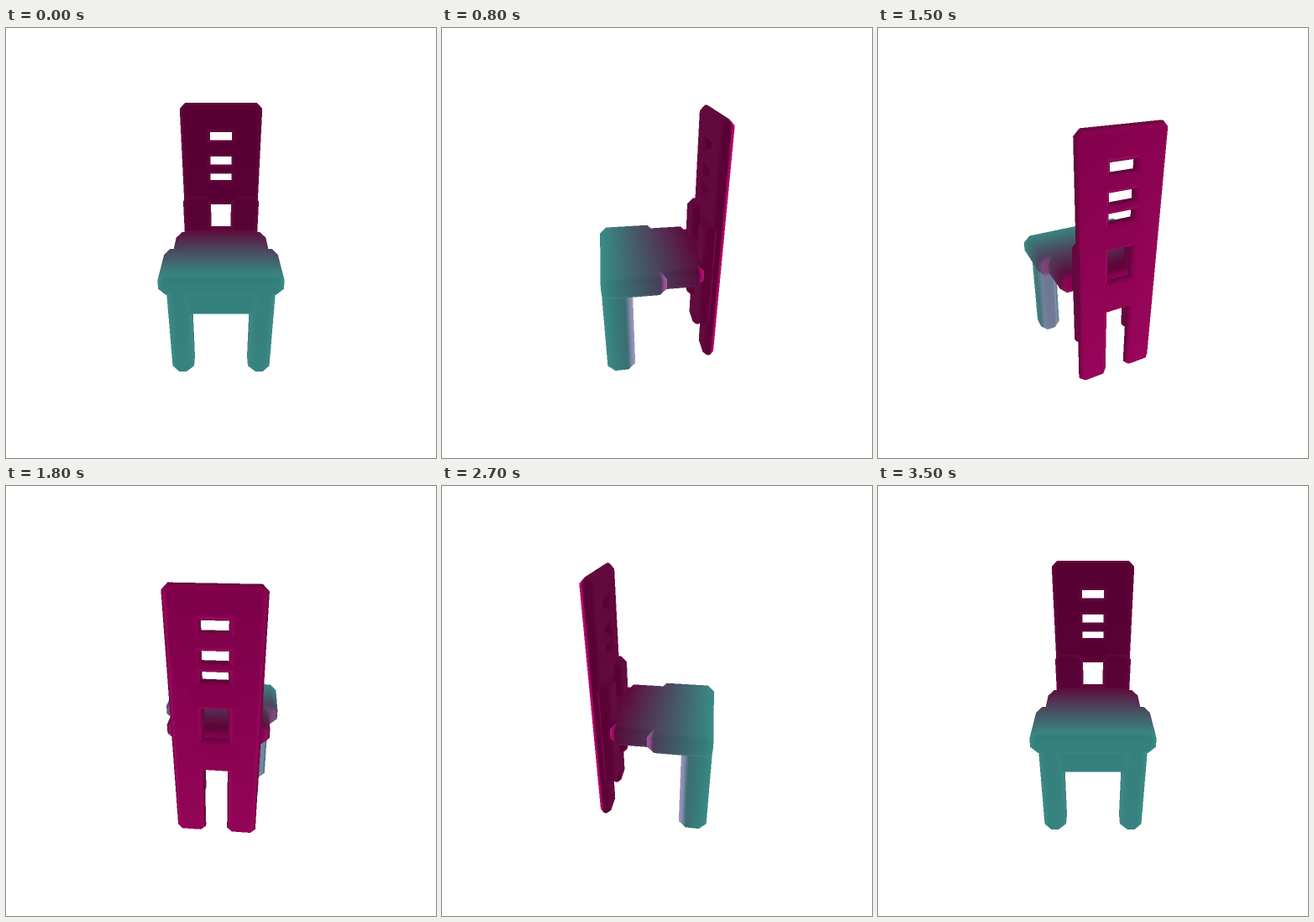
Recreate the animation shown at these times as an HTML page with a canvas. Size 512x512 px, loop 3600 ms.

```html
<!DOCTYPE html>
<html lang="en">
<head>
<meta charset="utf-8">
<title>Turning chair</title>
<style>
html, body { margin: 0; width: 100%; height: 100%; overflow: hidden; background: #fff; }
canvas { display: block; width: 512px; height: 512px; }
</style>
</head>
<body>
<canvas id="stage" width="512" height="512"></canvas>
<script>
const STEPS = 36, STEP_MS = 100;
const DIST = 454, TILT = 28.7 * Math.PI / 180;
const SIZE = 512, SS = 2, N = SIZE * SS;
const sinT = Math.sin(TILT), cosT = Math.cos(TILT);
const clamp = (v, lo, hi) => Math.min(hi, Math.max(lo, v));
const mix = (a, b, t) => a + (b - a) * t;

// Mesh: x right, y up, z towards the front of the chair
const verts = [], tris = [];

// Box with flat chamfers of size r, but smooth normals
function addBox(x0, x1, y0, y1, z0, z1, r) {
  const mid = [(x0 + x1) / 2, (y0 + y1) / 2, (z0 + z1) / 2];
  const half = [(x1 - x0) / 2, (y1 - y0) / 2, (z1 - z0) / 2];
  const cuts = half.map(h => [-h, -h + r, h - r, h]);
  for (let a = 0; a < 3; a++) for (const side of [-1, 1]) {
    const b = (a + 1) % 3, c = (a + 2) % 3, first = verts.length;
    for (const u of cuts[b]) for (const v of cuts[c]) {
      const q = [];
      q[a] = side * half[a]; q[b] = u; q[c] = v;
      const core = q.map((e, i) => clamp(e, r - half[i], half[i] - r));
      const d = q.map((e, i) => e - core[i]);
      const len = Math.hypot(...d);
      const span = d.reduce((sum, e) => sum + Math.abs(e), 0);
      verts.push({
        p: d.map((e, i) => mid[i] + core[i] + e / span * r),
        n: d.map(e => e / len)
      });
    }
    for (let i = 0; i < 3; i++) for (let j = 0; j < 3; j++) {
      const k = first + i * 4 + j;
      tris.push([k, k + 1, k + 4], [k + 1, k + 5, k + 4]);
    }
  }
}

function addPair(x0, x1, ...rest) {
  addBox(x0, x1, ...rest);
  addBox(-x1, -x0, ...rest);
}

// Back: posts, top rail and slats
addPair(13, 47.5, -148, 149, -68, -54, 6);
addPair(13, 48, -96, 38, -62, -44, 7);
addBox(-47.5, 47.5, 116.5, 149, -68, -54, 6);
for (const [lo, hi] of [[87.5, 106.5], [66, 76.5], [24.5, 56.5], [-54, -11.5]])
  addBox(-30, 30, lo, hi, -68, -54, 5);
// Seat: three overlapping slabs with one flush top
addBox(-68, 68, -32, -5, -3, 68, 8);
addBox(-58, 58, -32, -5, -46, 30, 8);
addBox(-47, 47, -30, -5, -62, -20, 6);
// Front legs and apron
addPair(33, 59.5, -149, -14, 34, 68, 9);
addBox(-40, 40, -60, -14, 44, 63, 5);

const depth = new Float32Array(N * N);
const big = document.createElement("canvas");
big.width = big.height = N;
const bigCtx = big.getContext("2d");
const image = bigCtx.createImageData(N, N);
const pixels = new Uint32Array(image.data.buffer);
const ctx = document.getElementById("stage").getContext("2d");
ctx.imageSmoothingQuality = "high";

// z runs from magenta at the back to teal at the front
function shade(z, glow, sheen) {
  const t = clamp((z + 46) / 106, 0, 1);
  const r = mix(88, 50, t) + glow + sheen;
  const g = mix(0, 126, t) + glow * 0.6 * t + sheen;
  const b = mix(51, 123, t) + glow * mix(0.58, 0.9, t) + sheen;
  return (255 << 24 | b << 16 | g << 8 | r) >>> 0;
}

function project({ p, n }, s, c) {
  const turn = ([x, y, z]) => {
    const h = x * c - z * s, d = x * s + z * c;
    return [h, y * cosT - d * sinT, y * sinT + d * cosT];
  };
  const [x, y, w] = turn(p), m = turn(n);
  const far = DIST - w, scale = DIST / far;
  const facing = (-m[0] * x - m[1] * y + m[2] * far) / Math.hypot(x, y, far);
  const graze = 1 - Math.max(0, facing);
  const rear = Math.min(1, 1.4 * Math.max(0, -n[2]));
  return {
    x: (SIZE / 2 + x * scale) * SS,
    y: (SIZE / 2 - y * scale) * SS,
    inv: 1 / far,
    z: p[2] / far,
    glow: rear * (36 + 55 * graze),
    sheen: 14 * graze
  };
}

function fill(a, b, c) {
  const area = (b.x - a.x) * (c.y - a.y) - (b.y - a.y) * (c.x - a.x);
  if (Math.abs(area) < 1e-6) return;
  const x0 = Math.ceil(Math.min(a.x, b.x, c.x) - 0.5), x1 = Math.max(a.x, b.x, c.x);
  const y0 = Math.ceil(Math.min(a.y, b.y, c.y) - 0.5), y1 = Math.max(a.y, b.y, c.y);
  for (let y = y0; y + 0.5 <= y1; y++) for (let x = x0; x + 0.5 <= x1; x++) {
    const px = x + 0.5, py = y + 0.5;
    const u = ((b.x - px) * (c.y - py) - (b.y - py) * (c.x - px)) / area;
    const v = ((c.x - px) * (a.y - py) - (c.y - py) * (a.x - px)) / area;
    const w = 1 - u - v;
    if (u < -1e-6 || v < -1e-6 || w < -1e-6) continue;
    const inv = u * a.inv + v * b.inv + w * c.inv, i = y * N + x;
    if (inv <= depth[i]) continue;
    depth[i] = inv;
    pixels[i] = shade((u * a.z + v * b.z + w * c.z) / inv,
                      u * a.glow + v * b.glow + w * c.glow,
                      u * a.sheen + v * b.sheen + w * c.sheen);
  }
}

function draw(step) {
  const angle = step / (STEPS - 1) * 2 * Math.PI;
  const s = Math.sin(angle), c = Math.cos(angle);
  depth.fill(0);
  pixels.fill(0xffffffff);
  const pts = verts.map(v => project(v, s, c));
  for (const [i, j, k] of tris) fill(pts[i], pts[j], pts[k]);
  bigCtx.putImageData(image, 0, 0);
  ctx.drawImage(big, 0, 0, SIZE, SIZE);
}

let shown = 0, start = null;
draw(0);

function tick(now) {
  if (start === null) start = now;
  const step = Math.floor(Math.max(0, now - start) / STEP_MS) % STEPS;
  if (step !== shown) draw(shown = step);
  requestAnimationFrame(tick);
}
requestAnimationFrame(tick);
</script>
</body>
</html>
```
